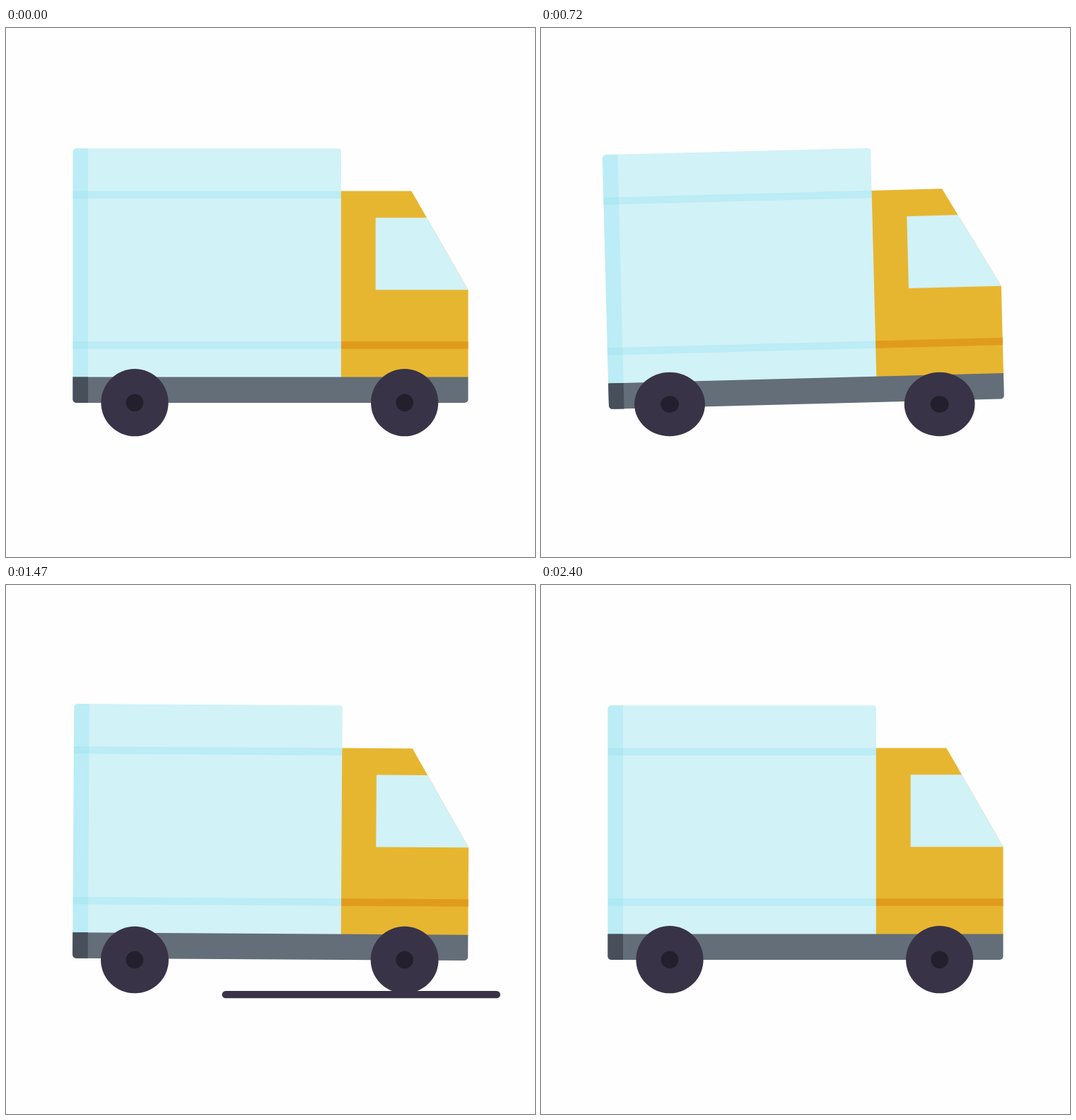
These frames come from a looping animation (748x748 px, 6.46 s). An HTML page with a canvas:

```html
<!DOCTYPE html>
<html lang="en">
<head>
<meta charset="utf-8">
<title>Delivery truck</title>
<style>
  html, body { margin: 0; width: 100%; height: 100%; overflow: hidden; background: #fefefe; }
  canvas { display: block; width: 748px; height: 748px; }
</style>
</head>
<body>
<canvas id="stage" width="748" height="748"></canvas>
<script>
const ctx = document.getElementById('stage').getContext('2d');
const SIZE = 748, LOOP = 6460, STEP = 30;
const DRIVE = 2400, ROCK = 1005;

const COLORS = {
  back: '#fefefe', box: '#d1f2f7', boxShade: 'rgba(139,220,239,0.3)',
  cab: '#e7b630', cabBand: '#e09b1d', chassis: '#636e78', chassisDark: '#474f5a',
  wheel: '#393347', hub: '#231f2c'
};

const clamp = u => Math.min(1, Math.max(0, u));
const ease = u => (1 - Math.cos(Math.PI * u)) / 2;

// Rocking runs at a steady rate, then its last quarter turn slows to rest.
function rock(t) {
  const brake = 1.75 * ROCK, rest = DRIVE - brake;
  const turns = t < brake
    ? t / ROCK
    : 2 - 0.25 * (1 - clamp((t - brake) / rest)) ** (4 * rest / ROCK);
  return Math.sin(2 * Math.PI * turns);
}

function pose(t) {
  const sway = rock(t), load = Math.abs(sway) ** 1.3;
  const lift = 1.1 * clamp(Math.min(t, DRIVE - t) / 300);
  return { tilt: 1.52 * sway, squash: 0.05 * load, drop: 2.9 * load - lift };
}

function rect(color, x0, y0, x1, y1, radii = 0) {
  ctx.fillStyle = color;
  ctx.beginPath();
  ctx.roundRect(x0, y0, x1 - x0, y1 - y0, radii);
  ctx.fill();
}

function poly(color, points) {
  ctx.fillStyle = color;
  ctx.beginPath();
  points.forEach(([x, y]) => ctx.lineTo(x, y));
  ctx.fill();
}

function disc(color, r) {
  ctx.fillStyle = color;
  ctx.beginPath();
  ctx.arc(0, -47.5, r, 0, Math.PI * 2);
  ctx.fill();
}

function drawBody({ tilt, drop }) {
  const left = 94.5, strip = 116, wall = 473.8, right = 653.5;
  const top = 170.3, roof = 230.6, deck = 493.6, hidden = deck + 1.4;
  const band = 443.3, bandSize = 10.4;

  ctx.save();
  ctx.translate(374, 472 + drop);
  ctx.rotate(tilt * Math.PI / 180);
  ctx.translate(-374, -472);

  poly(COLORS.cab, [[470, roof], [573.3, roof], [right, 370.3], [right, hidden], [470, hidden]]);
  poly(COLORS.box, [[522.6, 268.3], [595, 268.3], [right, 370.2], [522.6, 370.2]]);
  rect(COLORS.cabBand, 470, band, right, band + bandSize);

  rect(COLORS.box, left, top, wall, hidden, [5, 4, 0, 0]);
  rect(COLORS.boxShade, left, top, strip, hidden, [5, 0, 0, 0]);
  for (const y of [roof, band]) rect(COLORS.boxShade, left, y, wall, y + bandSize);

  rect(COLORS.chassis, left, deck, right, 530, [0, 0, 5, 5]);
  rect(COLORS.chassisDark, left, deck, strip, 530, [0, 0, 0, 5]);
  ctx.restore();
}

function drawWheel(x, squash) {
  ctx.save();
  ctx.translate(x, 577.2);
  ctx.scale(1 + squash, 1 - squash);
  disc(COLORS.wheel, 47.6);
  disc(COLORS.hub, 12.3);
  ctx.restore();
}

// A streak of road runs right to left; its tail follows its head.
function drawRoad(t) {
  const edge = (delay, span) => 753 - 758 * ease(clamp((t - delay) / span));
  const head = edge(5, 475), tail = edge(171, 575);
  if (tail - head > 0.5) rect(COLORS.wheel, head, 574, tail, 584.3, 5.15);
}

function draw(t) {
  ctx.fillStyle = COLORS.back;
  ctx.fillRect(0, 0, SIZE, SIZE);
  const now = pose(t);
  drawBody(now);
  for (const x of [182, 563.6]) drawWheel(x, now.squash);
  if (t < DRIVE) drawRoad(t % (DRIVE / 2));
}

const begin = performance.now();
function frame() {
  const t = (performance.now() - begin) % LOOP;
  draw(Math.floor(t / STEP) * STEP);
  requestAnimationFrame(frame);
}
frame();
</script>
</body>
</html>
```
